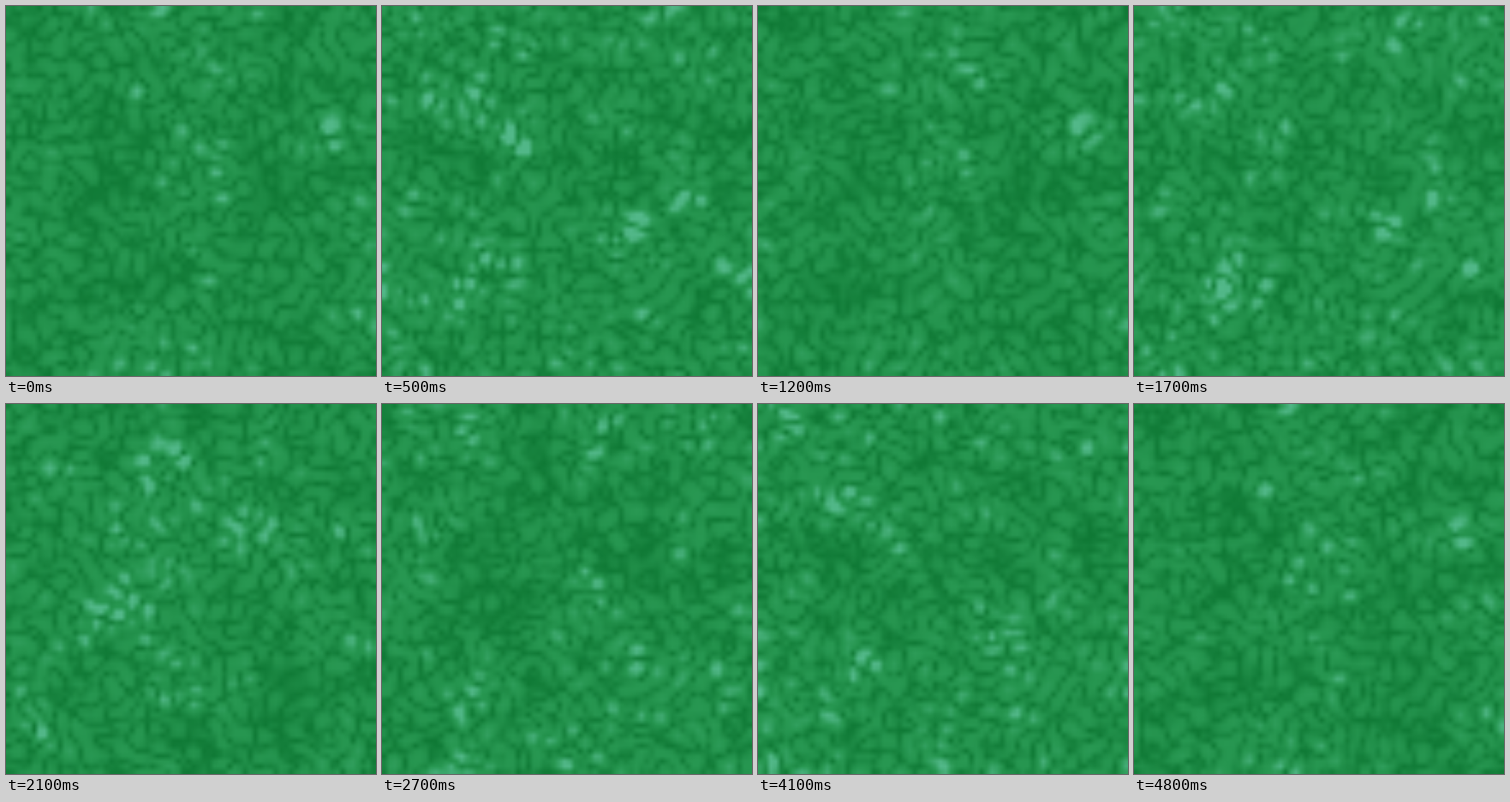
Animation of 432 by 432 pixels, one loop 4900 ms. Source, as an HTML page with a canvas:

```html
<!DOCTYPE html>
<html lang="en">
<head>
<meta charset="utf-8">
<title>Green labyrinth</title>
<style>
  html, body { margin: 0; width: 100%; height: 100%; overflow: hidden; background: #228c48; }
  canvas { display: block; width: 432px; height: 432px; }
</style>
</head>
<body>
<canvas id="view" width="72" height="72"></canvas>
<script>
const N = 72, CELL = 6, STEPS = 49, STEP_MS = 100, WAVE = 46;
const DARK = [15, 121, 53], GREEN = [40, 152, 82], LIGHT = [82, 184, 137];
const ctx = document.getElementById('view').getContext('2d');

let seed = 7341;
function random() {
  seed = (seed + 0x6D2B79F5) | 0;
  let r = Math.imul(seed ^ seed >>> 15, 1 | seed);
  r ^= r + Math.imul(r ^ r >>> 7, 61 | r);
  return ((r ^ r >>> 14) >>> 0) / 4294967296;
}
const noise = () => Float32Array.from({ length: N * N }, () => random() * 2 - 1);

// Separable Gaussian blur on a torus
function blur(src, sigma) {
  const reach = Math.ceil(sigma * 3);
  const weights = Array.from({ length: 2 * reach + 1 }, (_, i) => Math.exp(-(((i - reach) / sigma) ** 2) / 2));
  const total = weights.reduce((a, b) => a + b);
  const pass = (data, dx, dy) => data.map((_, i) => {
    const x = i % N, y = Math.floor(i / N);
    return weights.reduce((sum, w, j) => {
      const d = j - reach;
      return sum + w * data[(y + d * dy + N) % N * N + (x + d * dx + N) % N];
    }, 0) / total;
  });
  return pass(pass(src, 1, 0), 0, 1);
}

function normalise(field) {
  const rms = Math.sqrt(field.reduce((sum, v) => sum + v * v, 0) / field.length);
  return field.map(v => v / rms);
}

// Noise with one dominant wavelength: its zero lines form the labyrinth
function ripples() {
  const n = noise(), far = blur(n, 2.2);
  return normalise(blur(n, 1.25).map((v, i) => v - far[i]));
}
const clouds = () => normalise(blur(noise(), 4));

const still = ripples(), slow = [ripples(), ripples()], fast = [ripples(), ripples()];
const swell = [clouds(), clouds()];

// Lasting patterns: rings, or stripes across the direction `angle`
const motifs = [
  { x: 325, y: 105, size: 24 },
  { x: 400, y: 100, size: 32 },
  { x: 400, y: 195, size: 24 },
  { x: 310, y: 205, size: 36 },
  { x: 330, y: 335, size: 48, angle: Math.PI / 4 },
  { x: 100, y: 195, size: 34, angle: -Math.PI / 4 }
];

function addMotifs(value, x, y) {
  for (const m of motifs) {
    const dx = x - m.x, dy = y - m.y, r = Math.hypot(dx, dy);
    const d = m.angle === undefined ? r : dx * Math.cos(m.angle) + dy * Math.sin(m.angle);
    const weight = .7 * Math.exp(-((r / m.size) ** 2));
    value += weight * (1.3 * Math.cos(2 * Math.PI * d / WAVE) - value);
  }
  return value;
}

const mix = (a, b, t) => a + (b - a) * t;
const smooth = (lo, hi, v) => {
  const t = Math.min(1, Math.max(0, (v - lo) / (hi - lo)));
  return t * t * (3 - 2 * t);
};

function render(k) {
  const image = ctx.createImageData(N, N);
  const turn = ([a, b], cycles, i) => {
    const angle = 2 * Math.PI * cycles * k / STEPS;
    return a[i] * Math.cos(angle) + b[i] * Math.sin(angle);
  };
  for (let i = 0; i < N * N; i++) {
    const x = (i % N + .5) * CELL, y = (Math.floor(i / N) + .5) * CELL;
    const wave = .6 * still[i] + .5 * turn(slow, 1, i) + .6 * turn(fast, 4, i);
    const height = Math.abs(addMotifs(wave, x, y)) * Math.exp(.3 * turn(swell, 4, i));
    const level = Math.tanh(1.4 * height), light = smooth(1.5, 3.6, height);
    for (let c = 0; c < 3; c++)
      image.data[i * 4 + c] = mix(mix(DARK[c], GREEN[c], level), LIGHT[c], light);
    image.data[i * 4 + 3] = 255;
  }
  return image;
}

const cache = [];
let shown = -1;
function tick() {
  const k = Math.floor(performance.now() / STEP_MS) % STEPS;
  if (k !== shown) {
    ctx.putImageData(cache[k] ||= render(k), 0, 0);
    shown = k;
  }
  requestAnimationFrame(tick);
}
tick();
</script>
</body>
</html>
```
